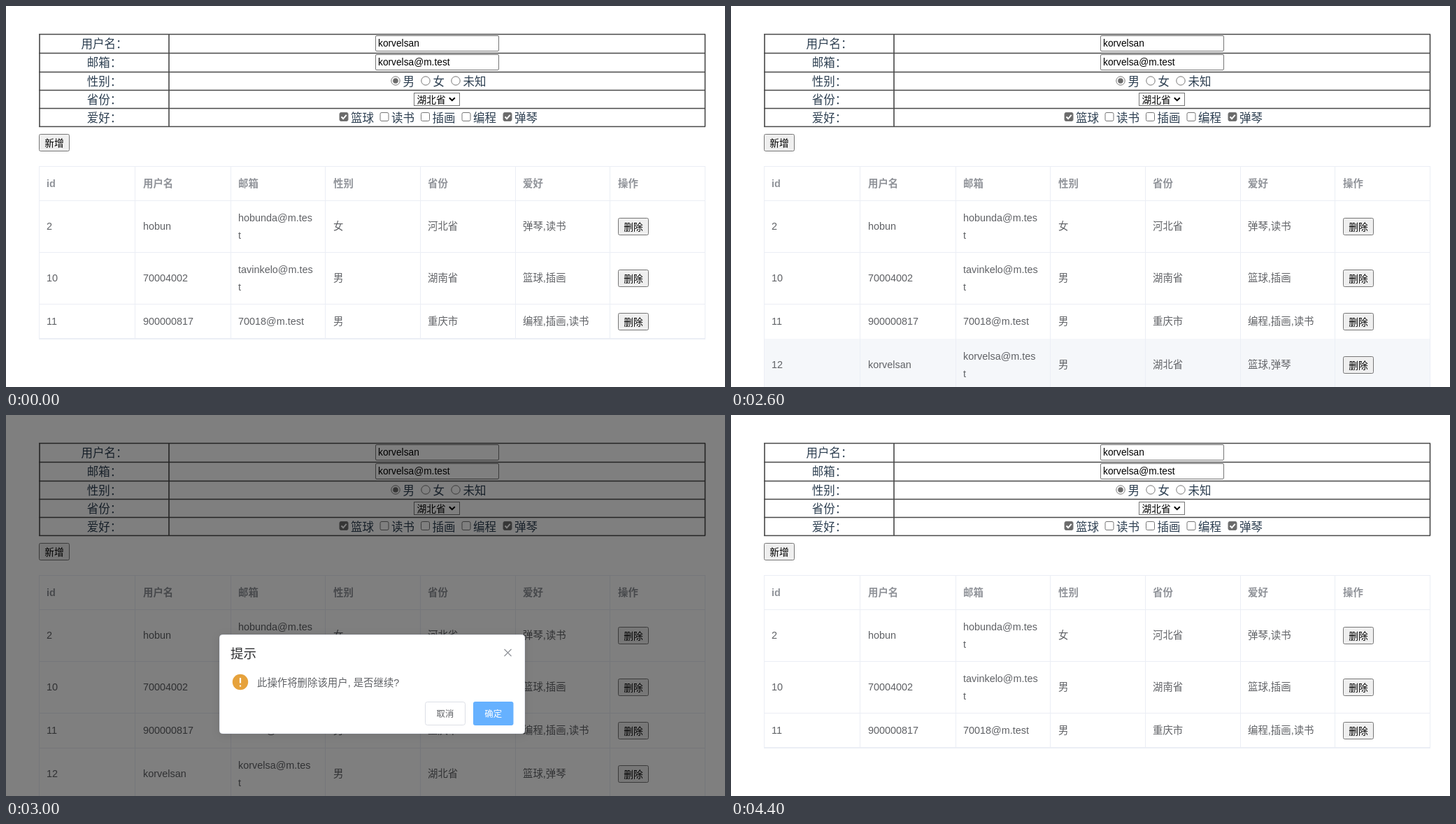
Recreate the animation shown at these times as an HTML page. Size 1028 px wide and 545 px high, loop 5900 ms.

```html
<!DOCTYPE html>
<html lang="zh-CN">
<head>
<meta charset="utf-8">
<style>
  html, body { margin: 0; width: 100%; height: 100%; overflow: hidden; background: #fff; }
  svg { display: block; font-family: "Liberation Sans", "Noto Sans CJK SC", "Noto Sans CJK", sans-serif; }
  text { white-space: pre; }
  .label { font-size: 16.5px; fill: #2c3e50; }
  .control { font-size: 13.75px; fill: #000; }
  .cell { font-size: 14.42px; fill: #606266; }
  .head { font-size: 14.42px; font-weight: bold; fill: #909399; }
  .title { font-size: 18.5px; fill: #303133; }
  .small { font-size: 12.4px; font-weight: 500; fill: #606266; text-anchor: middle; }
  .light { fill: #fff; }
  .mid { text-anchor: middle; }
  .box { fill: #fff; stroke: #767676; }
  .btn { fill: #efefef; stroke: #767676; }
  .hot .box { stroke: #404040; }
  .hot .btn { fill: #e5e5e5; stroke: #4f4f4f; }
  .grid { stroke: #ebeef5; fill: none; }
  .frame { stroke: #484848; stroke-width: 1.6; fill: none; }
  #panel { fill: #fff; stroke: #ebeef5; filter: drop-shadow(0 2px 6px rgba(0, 0, 0, .1)); }
</style>
</head>
<body>
<svg id="stage" width="1028" height="545" viewBox="0 0 1028 545"></svg>
<script>
const LOOP = 5900, ROW_IN = 1200, OPEN = 2633, PRESS = 3900, CLOSE = 3969, ROW_OUT = 4000;
const cols = [47.5, 184.5, 321.5, 456.5, 592.5, 728.5, 863.5, 999.5];
const textX = [58, 196, 332, 468, 603, 739, 875];

const text = (x, y, str, cls) => `<text x="${x}" y="${y}" class="${cls}">${str}</text>`;
const rect = (x, y, w, h, cls, r = 0, extra = '') =>
  `<rect x="${x}" y="${y}" width="${w}" height="${h}" rx="${r}" class="${cls}" ${extra}/>`;
const path = (d, cls, extra = '') => `<path d="${d}" class="${cls}" ${extra}/>`;
const group = (id, body) => `<g id="${id}">${body}</g>`;
const button = (id, x, y, label) =>
  group(id, rect(x + .5, y + .5, 43, 24, 'btn', 2) + text(x + 22, y + 17.6, label, 'control mid'));
const input = (id, y, value) =>
  group(id, rect(528.5, y + .5, 176, 22, 'box', 1.5) + text(532, y + 16, value, 'control'));

function radio(x, label, on) {
  return `<circle cx="${x}" cy="107" r="6.2" class="box"/>` +
    (on ? `<circle cx="${x}" cy="107" r="3.8" fill="#6b6b6b"/>` : '') +
    text(x + 10.5, 113.7, label, 'label');
}

function checkbox(x, label, on) {
  return rect(x - 6, 152.5, 12, 12, 'box', 2, on ? 'style="fill:#6b6b6b"' : '') +
    (on ? path(`M${x - 3.5} 158.5l2.6 2.8 4.6-5.4`, '', 'fill="none" stroke="#fff" stroke-width="2"') : '') +
    text(x + 10, 165.7, label, 'label');
}

function form() {
  const labels = ['用户名：', '邮箱：', '性别：', '省份：', '爱好：'];
  const edges = [40.5, 67.5, 94.5, 120.5, 146.5, 172.5];
  return path('M48 40.5V172.5M233 40.5V172.5M999.5 40.5V172.5' + edges.map(y => `M47 ${y}H1000`).join(''), 'frame') +
    labels.map((s, i) => text(140.5, (edges[i] + edges[i + 1]) / 2 + 6.2, s, 'label mid')).join('') +
    input('name', 42, 'korvelsan') + input('mail', 69, 'korvelsa@m.test') +
    radio(557, '男', true) + radio(600, '女') + radio(643, '未知') +
    rect(583.5, 124.5, 65, 18, 'box') + text(587.5, 138.6, '湖北省', 'control') +
    path('M633.8 131.2l4 4 4-4', '', 'fill="none" stroke="#000" stroke-width="2"') +
    checkbox(483, '篮球', true) + checkbox(541, '读书') + checkbox(599.5, '插画') +
    checkbox(658, '编程') + checkbox(717, '弹琴', true) +
    button('add', 47, 183, '新增');
}

function row(i, top, bottom, center, values) {
  const cells = values.map((v, c) => {
    const lines = v.split('|');
    return lines.map((s, k) =>
      text(textX[c], center + 5.3 + (k - (lines.length - 1) / 2) * 24.4, s, 'cell')).join('');
  }).join('');
  return group('row' + i,
    rect(47, top, 953, bottom - top, '', 0, `id="hover${i}" fill="#f5f7fa"`) +
    path(cols.map(x => `M${x} ${top}V${bottom}`).join('') + `M47 ${bottom}.5H1000`, 'grid') +
    cells + button('del' + i, 875, center - 12, '删除'));
}

function table() {
  const heads = ['id', '用户名', '邮箱', '性别', '省份', '爱好', '操作'];
  return path('M47 229.5H1000M47 278.5H1000' + cols.map(x => `M${x} 229V279`).join(''), 'grid') +
    heads.map((s, i) => text(textX[i], 259.4, s, 'head')).join('') +
    row(0, 279, 352, 315, ['2', 'hobun', 'hobunda@m.tes|t', '女', '河北省', '弹琴,读书']) +
    row(1, 352, 426, 389, ['10', '70004002', 'tavinkelo@m.tes|t', '男', '湖南省', '篮球,插画']) +
    row(2, 426, 476, 451, ['11', '900000817', '70018@m.test', '男', '重庆市', '编程,插画,读书']) +
    row(3, 476, 550, 513, ['12', 'korvelsan', 'korvelsa@m.tes|t', '男', '湖北省', '篮球,弹琴']) +
    group('tableEnd', path('M47 475.5H1000', 'grid'));
}

function dialog() {
  const emptyGlyphs = rect(326, 374, 11, 17, '', 0, 'fill="none" stroke="#e6a23c" stroke-width="2"') +
    rect(715.5, 334, 8, 11.5, '', 0, 'fill="none" stroke="#909399"');
  const icons = '<circle cx="335" cy="382" r="11.2" fill="#e6a23c"/>' +
    path('M335 376V383.5M335 386.4V388.6', '', 'stroke="#fff" stroke-width="2.2"') +
    path('M712.5 335l10 10m0-10l-10 10', '', 'stroke="#909399" stroke-width="1.2"');
  return rect(0, 0, 1028, 545, '', 0, 'id="shade"') + group('dialog',
    rect(305.5, 314.5, 436, 141, '', 4, 'id="panel"') +
    text(321, 348, '提示', 'title') +
    text(359, 388, '此操作将删除该用户, 是否继续?', 'cell') +
    group('glyphs', emptyGlyphs) + group('icons', icons) +
    rect(599.5, 410.5, 57, 33, '', 3, 'fill="#fff" stroke="#dcdfe6"') + text(628, 431.6, '取消', 'small') +
    rect(668, 410, 57.5, 34, '', 3, 'id="ok"') + text(696.7, 431.6, '确定', 'small light'));
}

// CSS "ease", clamped to 0..1
function ease(x) {
  if (x <= 0) return 0;
  if (x >= 1) return 1;
  let lo = 0, hi = 1, s;
  for (let i = 0; i < 20; i++) {
    s = (lo + hi) / 2;
    if (.75 * s * (1 - s) + s ** 3 < x) lo = s; else hi = s;
  }
  return .3 * s * (1 - s) ** 2 + 3 * s * s * (1 - s) + s ** 3;
}

const stage = document.getElementById('stage');
stage.innerHTML = form() + table() + dialog();

const $ = id => document.getElementById(id);
const show = (id, on) => $(id).style.display = on ? '' : 'none';
const fade = (t, from, to, ms) => ease((t - from) / ms) - ease((t - to) / ms);

const buttonHovers = { mail: [200, 300], add: [700, 1400], del1: [2000, 2100], del2: [2100, 2200], del3: [2400, 2600] };
const rowHovers = [[1650, 1800], [1850, 2050], [2050, 2200], [2200, 2700]];

function draw(t) {
  for (const [id, [from, to]] of Object.entries(buttonHovers))
    $(id).classList.toggle('hot', t >= from && t < to);
  rowHovers.forEach(([from, to], i) => $('hover' + i).style.opacity = fade(t, from, to, 250));
  const added = t >= ROW_IN && t < ROW_OUT;
  show('row3', added);
  show('tableEnd', !added);

  const shown = fade(t, OPEN, CLOSE, 300);
  $('shade').style.opacity = .5 * fade(t, OPEN, CLOSE, 200);
  $('dialog').style.opacity = shown;
  $('dialog').setAttribute('transform', `translate(0 ${-20.6 * (1 - shown)})`);
  show('dialog', shown > 0);
  show('glyphs', t < 2900);
  show('icons', t >= 2900);
  $('ok').setAttribute('fill', t < PRESS ? '#66b1ff' : '#50a0f5');
}

function tick() {
  draw(Math.floor(performance.now() % LOOP / 100) * 100);
  requestAnimationFrame(tick);
}
tick();
</script>
</body>
</html>
```
